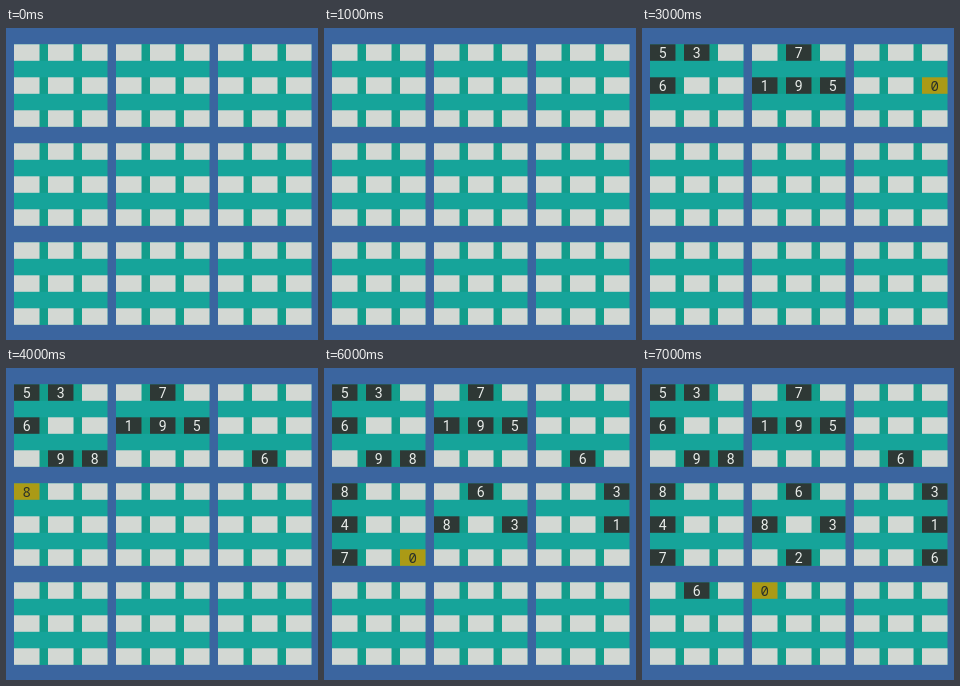
These frames come from a looping animation (312x312 px, 8 s). An HTML page with a canvas:

```html
<!DOCTYPE html>
<html lang="en">
<head>
<meta charset="utf-8">
<title>Sudoku</title>
<style>
html, body { margin: 0; height: 100%; overflow: hidden; background: #3b659f; }
canvas { display: block; }
</style>
</head>
<body>
<canvas id="stage" width="312" height="312"></canvas>
<script>
const ctx = document.getElementById('stage').getContext('2d');
const puzzle =
  '530070000' + '600195000' + '098000060' +
  '800060003' + '400803001' + '700020006' +
  '060000280' + '000419005' + '000080079';
const LOOP = 8000, CELL_W = 25.5, CELL_H = 16.5;

function rect(color, x, y, w, h) {
  ctx.fillStyle = color;
  ctx.fillRect(x, y, w, h);
}

function digit(value, color, font, x, y) {
  ctx.fillStyle = color;
  ctx.font = font;
  ctx.fillText(value, x + CELL_W / 2, y + 14);
}

function drawCell(i, cursor) {
  const col = i % 9, row = Math.floor(i / 9), value = puzzle[i];
  const x = 8 + 34 * col, y = 16.3 + 33 * row;
  if (col % 3 < 2) rect('#129d8b', x + CELL_W, y, 8.5, CELL_H);
  if (i === cursor) {
    rect('#ab9a16', x, y, CELL_W, CELL_H);
    digit(value, '#29302a', '14px "Noto Sans Mono", monospace', x, y);
  } else if (i < cursor && value !== '0') {
    rect('#2e3835', x, y, CELL_W, CELL_H);
    digit(value, '#e9edea', '14px Roboto, sans-serif', x, y);
  } else {
    rect('#d3d8d3', x, y, CELL_W, CELL_H);
  }
}

function draw(now) {
  const second = Math.floor(now % LOOP / 1000);
  const cursor = second < 2 ? -1 : 10 * second - 13;
  ctx.textAlign = 'center';
  rect('#3b659f', 0, 0, 312, 312);
  for (let b = 0; b < 9; b++)
    rect('#16a49a', 8 + b % 3 * 102, 16.3 + Math.floor(b / 3) * 99, 93.5, 82.5);
  for (let i = 0; i < 81; i++) drawCell(i, cursor);
}

const start = performance.now();
function tick() {
  draw(performance.now() - start);
  requestAnimationFrame(tick);
}
tick();
</script>
</body>
</html>
```
